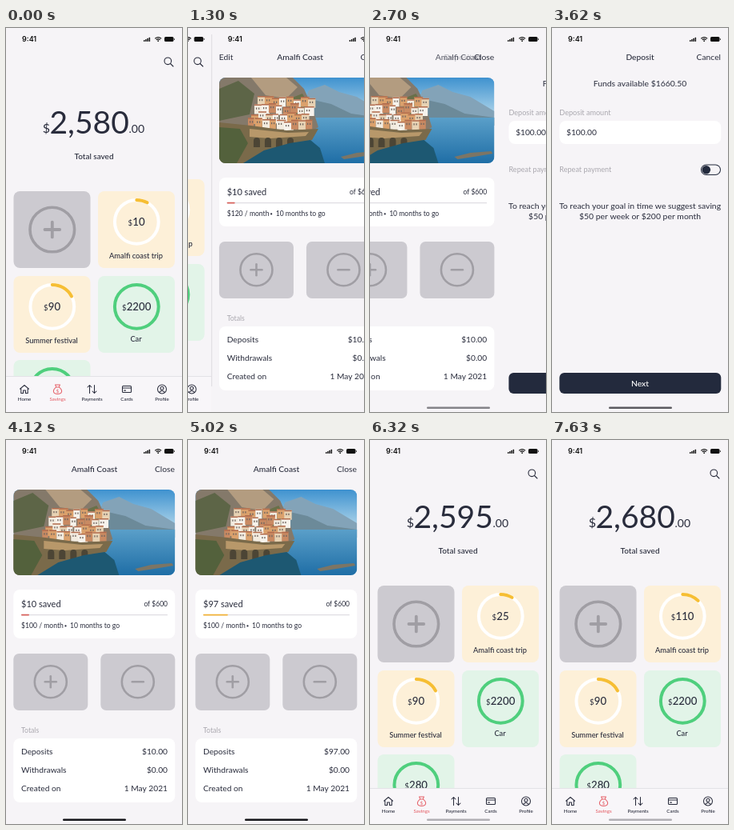
Recreate the animation shown at these times as an HTML page with a canvas. Size 220 by 480 pixels, loop 7.73 s.

```html
<!DOCTYPE html>
<html lang="en">
<head>
<meta charset="utf-8">
<title>Savings goals</title>
<style>
  html, body { margin: 0; width: 220px; height: 480px; overflow: hidden; background: #f6f4f7; }
  canvas { display: block; width: 220px; height: 480px; }
</style>
</head>
<body>
<canvas id="stage"></canvas>
<script>
const W = 220, H = 480, LOOP = 7730;
const BG = '#f6f4f7', INK = '#292c3c', MUTED = '#aaa8af', GREY = '#cccad0', MARK = '#a09ea4';
const YELLOW = '#f6be33', GREEN = '#4fcf7d', CORAL = '#e5626a';
const canvas = document.getElementById('stage');
const dpr = window.devicePixelRatio || 1;
canvas.width = W * dpr;
canvas.height = H * dpr;
const c = canvas.getContext('2d');

// ---- drawing helpers ----
function text(s, x, y, size, { align = 'left', color = INK, weight = 400, font = 'Lato' } = {}) {
  c.font = `${weight} ${size}px ${font}, sans-serif`;
  c.textAlign = align;
  c.fillStyle = color;
  c.fillText(s, x, y);
}
const mid = (s, x, y, size, more) => text(s, x, y, size, { align: 'center', ...more });
const right = (s, x, y, size, more) => text(s, x, y, size, { align: 'right', ...more });

function box(x, y, w, h, r, color) {
  c.beginPath();
  c.roundRect(x, y, w, h, r);
  c.fillStyle = color;
  c.fill();
}
function arc(x, y, r, color, width, degrees = 360) {
  c.beginPath();
  c.arc(x, y, r, -Math.PI / 2, (degrees - 90) * Math.PI / 180);
  c.strokeStyle = color;
  c.lineWidth = width;
  c.stroke();
}
function disc(x, y, r, color) {
  c.beginPath();
  c.arc(x, y, r, 0, 7);
  c.fillStyle = color;
  c.fill();
}
function path(d, color, width) {
  c.strokeStyle = color;
  c.lineWidth = width;
  c.stroke(new Path2D(d));
}
function poly(color, ...pts) {
  c.beginPath();
  for (let i = 0; i < pts.length; i += 2) c.lineTo(pts[i], pts[i + 1]);
  c.fillStyle = color;
  c.fill();
}
function fade(y0, y1, from, to) {
  const g = c.createLinearGradient(0, y0, 0, y1);
  g.addColorStop(0, from);
  g.addColorStop(1, to);
  return g;
}
function at(x, y, draw) {
  c.save();
  c.translate(x, y);
  draw();
  c.restore();
}
function withAlpha(a, draw) {
  c.save();
  c.globalAlpha *= a;
  draw();
  c.restore();
}

// ---- motion helpers ----
const mix = (a, b, p) => a + (b - a) * p;
function spring(t, start) {
  const u = Math.max(0, t - start) * 0.0135;
  return u > 6.5 ? 1 : 1 - (1 + u) * Math.exp(-u);
}
function ramp(t, a, b) {
  const p = Math.min(1, Math.max(0, (t - a) / (b - a)));
  return p * p * (3 - 2 * p);
}

// ---- shared parts ----
function statusBar() {
  text('9:41', 20, 17, 9, { weight: 600, font: 'Inter', color: '#111' });
  for (let i = 0; i < 4; i++) box(172 + i * 2.2, 15 - i * 1.1, 1.5, 2 + i * 1.1, 0.4, '#111');
  c.lineCap = 'butt';
  path('M186.3 13.2Q190.2 10 194.1 13.2M187.8 14.8Q190.2 12.8 192.6 14.8', '#111', 1.2);
  disc(190.2, 16.2, 0.9, '#111');
  box(198, 11, 11.5, 6, 1.6, '#111');
  box(210, 13, 0.9, 2, 0.4, '#111');
  c.lineCap = 'round';
}

// ---- home screen ----
function amount(value, x, y) {
  c.font = '400 13.2px Lato, sans-serif';
  const w = c.measureText(value).width, left = x - w / 2 + 3;
  right('$', left - 0.3, y, 9.5);
  text(value, left, y, 13.2, { weight: 500 });
}
function goal(x, y, color, value, degrees, label, labelY) {
  const done = degrees === 360;
  box(x, y, 96, 96, 8, color);
  arc(x + 48.3, y + 38.3, 27.4, done ? GREEN : '#fff', 4);
  if (!done) arc(x + 48.3, y + 38.3, 27.4, YELLOW, 4, degrees);
  amount(value, x + 48, y + 43);
  mid(label, x + 47.5, labelY, 9.3, { weight: 500 });
}
const tabs = [
  ['Home', 23, 'M-5.5-.3 0-5 5.5-.3M-4.2-1.2V5H-1.4V1.5H1.4V5H4.2V-1.2'],
  ['Savings', 64.5, 'M-1.7-2.6C-6.5 1-6.5 6 0 6S6.5 1 1.7-2.6ZM-1.7-2.6-3-5.6H3L1.7-2.6'],
  ['Payments', 107.5, 'M-3 5V-5M-5.5-2.5-3-5-.5-2.5M3-5V5M.5 2.5 3 5 5.5 2.5'],
  ['Cards', 151, 'M-4.5-4H4.5Q5.5-4 5.5-3V3Q5.5 4 4.5 4H-4.5Q-5.5 4-5.5 3V-3Q-5.5-4-4.5-4ZM-5.5-1.5H5.5M-3.3 1.6H-1.5'],
  ['Profile', 195, 'M5.5 0A5.5 5.5 0 1 1-5.5 0A5.5 5.5 0 1 1 5.5 0M2-1.2A2 2 0 1 1-2-1.2A2 2 0 1 1 2-1.2M-3.5 4Q0 0 3.5 4']
];
function tabBar() {
  box(0, 435, W, 45, 0, '#f8f6f9');
  box(0, 435, W, 0.7, 0, '#dddbe1');
  tabs.forEach(([name, x, d], i) => {
    const color = i === 1 ? CORAL : INK;
    at(x, 451.5, () => path(d, color, 1.05));
    if (i === 1) mid('$', x, 455.5, 6.5, { color });
    mid(name, x, 466, 6.1, { color, weight: 500 });
  });
}
function home(shift, gain) {
  box(0, 0, W, H, 0, BG);
  at(0, shift, () => {
    right('$', 55, 109, 16);
    text((2580 + gain).toLocaleString('en-US'), 54.5, 110, 39);
    text('.00', 153.5, 109, 14);
    mid('Total saved', 110, 141.5, 10, { weight: 500 });

    box(9.5, 182, 96, 96, 8, GREY);
    arc(57.8, 230, 27.8, MARK, 3.6);
    path('M48.5 230H67.2M57.8 220.6V239.4', MARK, 3.8);
    goal(115, 182, '#fdf0d8', String(10 + gain), mix(29, 45, gain / 100), 'Amalfi coast trip', 266.3);
    goal(9.5, 288, '#fdf0d8', '90', 62, 'Summer festival', 372);
    goal(115, 288, '#e2f4e8', '2200', 360, 'Car', 370);
    goal(9.5, 393, '#e2f4e8', '280', 360, '', 0);
  });
  tabBar();
  arc(202.3, 41.3, 4.3, INK, 1.1);
  path('M205.5 44.5 209 48', INK, 1.1);
  statusBar();
}

// ---- goal detail ----
function photo() {
  c.beginPath();
  c.roundRect(0, 0, 202, 107, 8);
  c.clip();
  box(0, 0, 202, 107, 0, fade(0, 50, '#3f92cf', '#b5d9ec'));
  poly('#83a3b8', 95, 60, 112, 16, 132, 9, 150, 18, 172, 24, 202, 42, 202, 60);
  poly('#6c8a99', 100, 60, 118, 28, 140, 33, 165, 45, 202, 50, 202, 60);
  box(90, 50, 112, 57, 0, fade(50, 107, '#5a9fc9', '#1f6ea6'));
  poly('#84796a', 0, 0, 92, 0, 106, 14, 116, 36, 124, 62, 90, 82, 0, 107);
  poly('#b39c80', 40, 0, 84, 0, 98, 12, 84, 26, 58, 22);
  poly('#5d6547', 0, 14, 24, 4, 44, 20, 38, 46, 0, 54);
  poly('#697049', 84, 28, 104, 20, 118, 44, 96, 52);
  let seed = 11;
  const rnd = () => (seed = seed * 16807 % 2147483647) / 2147483647;
  const walls = ['#f3ece0', '#e8d3b4', '#dba16c', '#f7f3ec', '#c98a62'];
  for (let row = 0; row < 4; row++) {
    for (let x = 36 + (3 - row) * 4; x < 112; x += 9) {
      const y = 23 + row * 9 + rnd() * 5, w = 7 + rnd() * 5;
      box(x, y, w, 12, 0, walls[Math.floor(rnd() * 5)]);
      box(x, y, w, 1.5, 0, '#b26b4c');
      box(x + 2, y + 4, 1.3, 2.3, 0, '#6f6660');
      box(x + 5, y + 4, 1.3, 2.3, 0, '#6f6660');
    }
  }
  poly('#7a6a4a', 0, 56, 40, 60, 84, 66, 124, 64, 116, 78, 84, 84, 56, 92, 36, 107, 0, 107);
  poly('#53613c', 0, 62, 26, 64, 36, 82, 22, 107, 0, 107);
  poly('#b8986a', 38, 64, 86, 69, 112, 68, 108, 73, 64, 76, 38, 74);
  for (let i = 0; i < 4; i++) box(43 + i * 14, 75, 8, 12, [4, 4, 0, 0], '#4c4535');
  poly('#1d5872', 30, 107, 56, 91, 88, 82, 114, 78, 126, 88, 132, 107);
  poly('#7c7565', 152, 99, 172, 94, 198, 92, 200, 95, 176, 99, 156, 102);
}
function deposited(value) {
  return '$' + value + '.00';
}
function detail(gain, later, edit) {
  right('Close', 211, 40, 10.3);
  if (edit) text('Edit', 9, 40, 10.3);
  at(9.3, 62, photo);

  box(9.3, 187, 202, 61, 8, '#fff');
  text(`$${10 + gain} saved`, 19, 209, 11);
  right('of $600', 202, 208, 8.5);
  const p = gain / 100;
  box(19, 218, 183, 1.3, 0.6, '#dfdde2');
  box(19, 217.7, mix(10, 34, p), 1.8, 0.9, `rgb(${mix(216, 246, p)},${mix(98, 190, p)},${mix(92, 51, p)})`);
  text(later ? '$100 / month' : '$120 / month', 19, 235, 8.6);
  disc(74.5, 232.4, 1.1, INK);
  text('10 months to go', 80, 235, 8.6);

  for (const x of [9.3, 118.3]) {
    box(x, 267, 93, 71, 7, GREY);
    arc(x + 46.5, 302.3, 20, MARK, 2.6);
    path(`M${x + 39.5} 302.3h14`, MARK, 2.6);
  }
  path('M55.8 295.3v14', MARK, 2.6);

  text('Totals', 19, 366, 8.7, { color: MUTED });
  box(9.3, 373, 202, 80, 8, '#fff');
  const rows = [['Deposits', deposited(10 + gain)], ['Withdrawals', '$0.00'], ['Created on', '1 May 2021']];
  rows.forEach(([name, value], i) => {
    text(name, 19, 393.3 + i * 23, 10.2);
    right(value, 202, 393.3 + i * 23, 10.2);
  });
}

// ---- deposit form ----
function deposit() {
  right('Cancel', 211, 40, 10.3);
  mid('Funds available $1660.50', 110, 72.7, 10.4);
  text('Deposit amount', 9.3, 108.5, 9.1, { color: MUTED });
  box(9.3, 116, 202, 29, 8, '#fff');
  text('$100.00', 18, 133.7, 10.2);
  text('Repeat payment', 9.3, 180.3, 9.1, { color: MUTED });
  box(186, 170.5, 25, 13.5, 6.8, '#232a3d');
  box(187, 171.5, 23, 11.5, 5.8, BG);
  disc(192.8, 177.2, 5.3, '#232a3d');
  mid('To reach your goal in time we suggest saving', 110, 225.8, 10.4);
  mid('$50 per week or $200 per month', 110, 239.3, 10.4);
  box(9.3, 431, 202, 26, 6, '#232a3d');
  mid('Next', 110, 447.5, 10.4, { color: '#fff', weight: 500 });
}

function homeIndicator(t) {
  if (t < 2250 || (t >= 5620 && t < 6120)) return;
  const color = t < 3200 ? '#858489' : t < 3900 ? '#5c5b60' : t < 5620 ? '#17171b' : '#b2b0b5';
  box(71, 473.4, 79, 2.6, 1.3, color);
}

function render(t) {
  c.setTransform(dpr, 0, 0, dpr, 0, 0);
  c.lineCap = c.lineJoin = 'round';
  box(0, 0, W, H, 0, BG);

  // open: 0 = home, 1 = goal detail; form: 0 = detail, 1 = deposit form
  const open = t < 1300 ? 0 : t < 5620 ? spring(t, 1041) : 1 - spring(t, 5503);
  const form = spring(t, 2629) - spring(t, 3630);
  const goalGain = Math.round(100 * ramp(t, 4400, 5200));
  const homeGain = Math.round(100 * ramp(t, 6120, 6950));
  const shift = t < 100 ? 22 : t < 5000 ? 7 : 0;

  if (open < 1) at(-W * open, 0, () => home(shift, homeGain));
  if (open > 0) at(W * (1 - open), 0, () => {
    box(0, 0, W, H, 0, BG);
    if (open < 1) box(-0.5, 8, 1, 440, 0, '#dedce1');
    if (form < 1) at(-W * form, 0, () => detail(goalGain, t > 3630, t < 3000));
    if (form > 0) at(W * (1 - form), 0, deposit);
    withAlpha(1 - form, () => mid('Amalfi Coast', 110.5, 40, 10.3, { weight: 500 }));
    withAlpha(form, () => mid('Deposit', 110, 40, 10.2, { weight: 500 }));
    statusBar();
  });
  homeIndicator(t);
}

const began = performance.now();
function tick() {
  render((performance.now() - began) % LOOP);
  requestAnimationFrame(tick);
}
tick();
</script>
</body>
</html>
```
